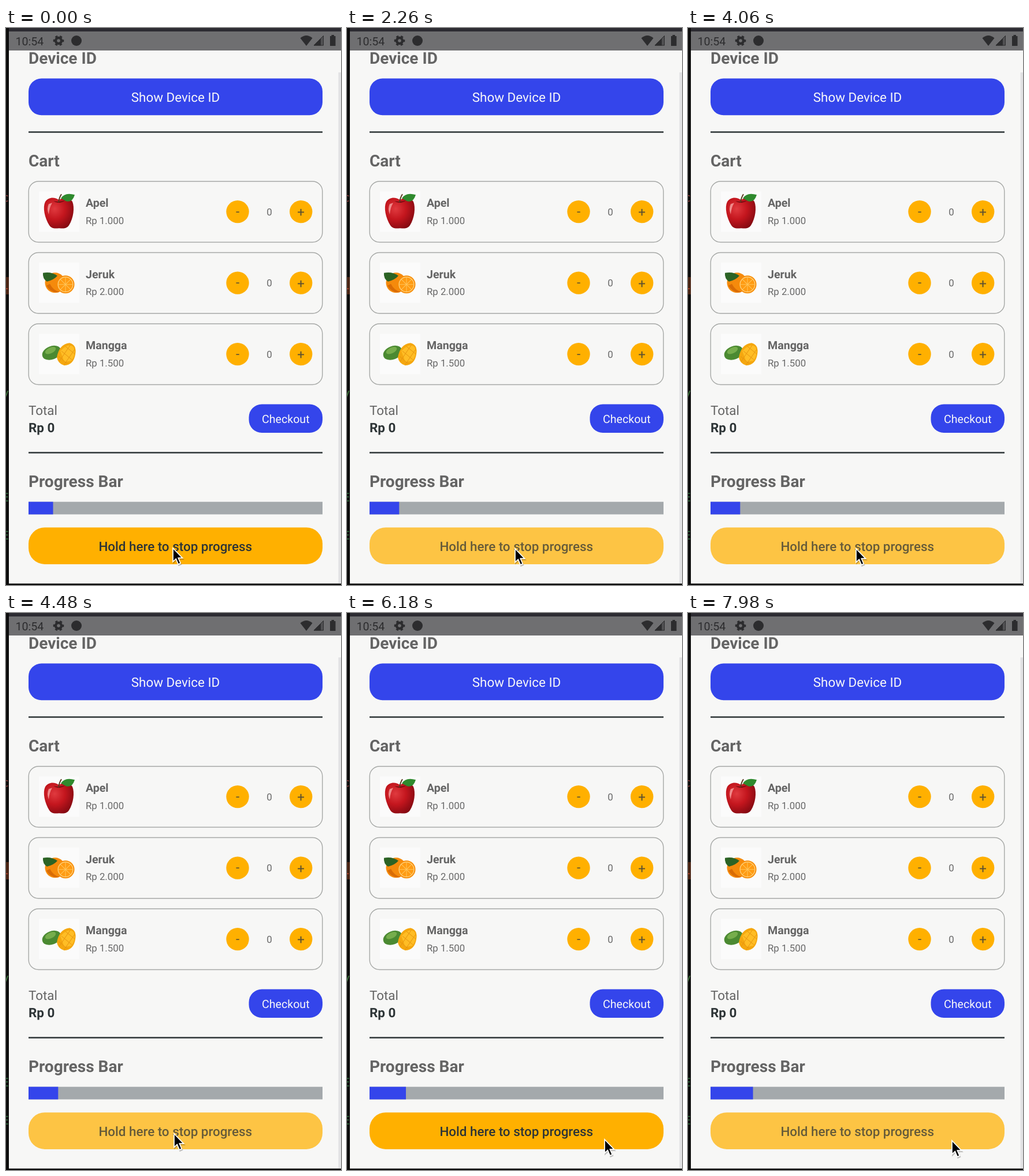
An HTML page for the animation above (8000 ms loop, 580 by 966 pixels).

```html
<!DOCTYPE html>
<html lang="id">
<head>
<meta charset="utf-8">
<title>Cart and progress</title>
<style>
  html, body { margin: 0; width: 100%; height: 100%; overflow: hidden; background: #f7f7f6; }
  svg { display: block; width: 580px; height: 966px; font-family: Roboto, sans-serif; text-rendering: geometricPrecision; }
  .heading { font-size: 28px; font-weight: 700; fill: #646464; }
  .name { font-size: 19.6px; font-weight: 700; fill: #646464; }
  .small { font-size: 16.8px; fill: #686868; }
  .label { font-size: 22.4px; }
  .mid { text-anchor: middle; }
  .code { font: 20px "DejaVu Sans Mono", monospace; text-anchor: end; }
</style>
</head>
<body>
<svg viewBox="0 0 580 966">
  <defs>
    <radialGradient id="appleSkin" cx=".36" cy=".36" r=".7">
      <stop offset="0" stop-color="#e03a3f"/>
      <stop offset=".5" stop-color="#c4161e"/>
      <stop offset="1" stop-color="#860a12"/>
    </radialGradient>
  </defs>
  <rect width="580" height="966" fill="#f7f7f6"/>

  <!-- app content -->
  <text class="heading" x="39" y="62">Device ID</text>
  <rect x="39" y="87.5" width="509" height="63.7" rx="22.4" fill="#3445eb"/>
  <text class="label mid" x="293.5" y="128.2" fill="#f8f8f8">Show Device ID</text>
  <path d="M39 180.5H548M39 736.5H548" stroke="#2d3436" stroke-width="2.6"/>
  <text class="heading" x="39" y="240">Cart</text>
  <g id="cart"></g>
  <text class="label" x="39" y="671" fill="#646464">Total</text>
  <text class="label" x="39" y="701" fill="#2d3436" font-weight="700">Rp 0</text>
  <rect x="420.5" y="652.5" width="127.5" height="49.5" rx="22.4" fill="#3445eb"/>
  <text class="mid" x="484.3" y="685" font-size="19.6" fill="#f8f8f8">Checkout</text>
  <text class="heading" x="39" y="796">Progress Bar</text>
  <rect x="39" y="821.7" width="509" height="21.8" fill="#a4a9ac"/>
  <rect id="progress" x="39" y="821.7" height="21.8" fill="#3445eb"/>
  <rect id="holdFill" x="39" y="866.2" width="509" height="63.8" rx="28" fill="#ffb000"/>
  <text id="holdText" class="label mid" x="293.3" y="907" font-weight="500" fill="#2d3436">Hold here to stop progress</text>
  <rect x="575.5" y="77" width="4.5" height="886" fill="#e2e2e4"/>

  <!-- status bar -->
  <rect x="5" y="5" width="575" height="34" fill="#6f6f71"/>
  <g fill="#2c2c2e">
    <text x="16.5" y="29.5" font-size="19.6">10:54</text>
    <circle cx="91" cy="22" r="5" fill="none" stroke="#2c2c2e" stroke-width="4.4"/>
    <circle cx="91" cy="22" r="8" fill="none" stroke="#2c2c2e" stroke-width="2.6" stroke-dasharray="4.19" stroke-dashoffset="2.1"/>
    <circle cx="122" cy="22" r="9"/>
    <path d="M509.5 17.5Q520 8.5 530.5 17.5L520 31Z"/>
    <path d="M533 30.5L550 13V30.5Z" opacity=".45"/>
    <path d="M533 30.5L545 18V30.5Z"/>
    <path d="M533 30L549.5 13.5V30Z" fill="none" stroke="#2c2c2e"/>
    <path d="M561 14H563.5V12H568V14H570.5V31H561Z"/>
  </g>

  <!-- window edges -->
  <rect width="580" height="6" fill="#2d2c32"/>
  <rect width="5" height="966" fill="#0d0d0d"/>
  <rect y="963.5" width="580" height="2.5" fill="#0d0d0d"/>
  <rect y="432" width="5" height="30" fill="#4a2414"/>
  <g class="code">
    <text x="5" y="301" fill="#8c3b3b">c</text>
    <text x="5" y="453" fill="#b4442c">l</text>
    <text x="5" y="640" fill="#3f7a3c">y</text>
    <text x="5" y="821" fill="#2f6a3c">E</text>
    <text x="5" y="887" fill="#2f6a3c">E</text>
  </g>

  <g id="cursor">
    <path d="M0 0V23.5L5.3 18.6L9.2 28L13.2 26.2L9.3 17.2H16.5Z" transform="translate(1 2)" opacity=".22" stroke="#000" stroke-width="2"/>
    <path d="M0 0V23.5L5.3 18.6L9.2 28L13.2 26.2L9.3 17.2H16.5Z" stroke="#fff" stroke-width="1.7"/>
  </g>
</svg>

<script>
const LOOP = 8000;
const byId = id => document.getElementById(id);

// Fruit drawings, relative to the top of their card.
const apple = `
  <path d="M92 33C84 27 73 28 68 36C63 46 67 64 75 77C80 84 86 82 92 82C98 82 104 84 109 77C117 64 119 46 115 36C110 28 99 27 92 33Z" fill="url(#appleSkin)"/>
  <path d="M74 40Q70 48 74 58Q75 46 80 38Z" fill="#f08a8a"/>
  <path d="M82 35Q92 41 102 34Q93 37 82 35Z" fill="#6d0a10"/>
  <path d="M91 37Q92 29 96 23" fill="none" stroke="#5b3a20" stroke-width="2"/>
  <path d="M95 30Q102 19 119 24Q115 38 104 35Z" fill="#2f8a2e"/>`;

const wedges = [0, 45, 90, 135].map(angle =>
  `<path d="M90.5 56H115.5" transform="rotate(${angle} 103 56)" stroke="#ffc65c"/>`).join('');
const orange = `
  <circle cx="85" cy="53" r="17.5" fill="#f58a0c"/>
  <path d="M70 58Q78 72 93 69Q82 67 76 55Z" fill="#d96c05"/>
  <path d="M64 36Q78 33 89 41Q83 48 71 51Q63 46 64 36Z" fill="#2c6325"/>
  <circle cx="103" cy="56" r="15.5" fill="#f78d08"/>
  <circle cx="103" cy="56" r="13.5" fill="#ffd78a"/>
  <circle cx="103" cy="56" r="12.3" fill="#ff9b13"/>${wedges}`;

const mango = `
  <ellipse cx="79" cy="51" rx="17" ry="11.5" transform="rotate(-22 79 51)" fill="#4b8a32"/>
  <ellipse cx="77" cy="47" rx="10" ry="5" transform="rotate(-25 77 47)" fill="#76ad4c"/>
  <path d="M88 59Q92 36 110 34Q123 37 120 54Q117 72 101 73Q90 70 88 59Z" fill="#f5a70f"/>
  <path d="M94 48Q108 33 117 41Q122 54 113 65L101 67Z" fill="#ffbd25"/>
  <path d="M91 57L106 70M96 48L114 63M103 40L119 53M92 66L111 38M101 71L119 45" stroke="#e6940f"/>`;

const roundButton = (x, sign, baseline) => `
  <circle cx="${x}" cy="53.3" r="19.7" fill="#ffb000"/>
  <text class="label mid" x="${x}" y="${baseline}" fill="#5d5130">${sign}</text>`;

const card = ([name, price, fruit], i) => `
  <g transform="translate(0 ${265.3 + i * 123.5})">
    <rect x="39.2" y=".7" width="508.6" height="105.5" rx="17" fill="none" stroke="#a6a8a6" stroke-width="1.4"/>
    <rect x="57" y="18" width="70" height="70" fill="#fbfbfb"/>
    ${fruit}
    <text class="name" x="138" y="45.2">${name}</text>
    <text class="small" x="138" y="74.7">Rp ${price}</text>
    ${roundButton(401, '-', 60.5)}
    <text class="small mid" x="456" y="59.7">0</text>
    ${roundButton(510.7, '+', 62)}
  </g>`;

byId('cart').innerHTML = [
  ['Apel', '1.000', apple],
  ['Jeruk', '2.000', orange],
  ['Mangga', '1.500', mango],
].map(card).join('');

const clamp01 = v => Math.max(0, Math.min(1, v));
const smooth = v => v * v * (3 - 2 * v);
const ramp = (t, start, duration) => smooth(clamp01((t - start) / duration));

const PRESS = 1060, RELEASE = 4770, PRESS_AGAIN = 7450;

// [time, x, y] of the pointer tip
const path = [
  [0, 289, 902], [500, 291, 903], [4900, 291, 903], [5340, 314, 903],
  [5750, 400, 909], [6180, 446, 913], [6650, 457, 915], [LOOP, 457, 915],
];

function pointerAt(t) {
  const next = path.findIndex(p => p[0] > t);
  const [t0, x0, y0] = path[next - 1], [t1, x1, y1] = path[next];
  const k = (t - t0) / (t1 - t0);
  return [x0 + (x1 - x0) * k, y0 + (y1 - y0) * k];
}

function draw(now) {
  const t = now % LOOP;
  const running = Math.min(t, PRESS) + Math.max(0, Math.min(t, PRESS_AGAIN) - RELEASE);
  const pressed = ramp(t, PRESS, 150) - ramp(t, RELEASE, 250) + ramp(t, PRESS_AGAIN, 150);
  byId('progress').setAttribute('width', 42.5 + running * 0.0083);
  // Fill and text fade separately, so the fill shows through the text.
  for (const id of ['holdFill', 'holdText']) byId(id).setAttribute('opacity', 1 - 0.28 * pressed);
  byId('cursor').setAttribute('transform', `translate(${pointerAt(t)})`);
}

const start = performance.now();
function tick() {
  draw(Math.max(0, performance.now() - start));
  requestAnimationFrame(tick);
}
tick();
</script>
</body>
</html>
```
